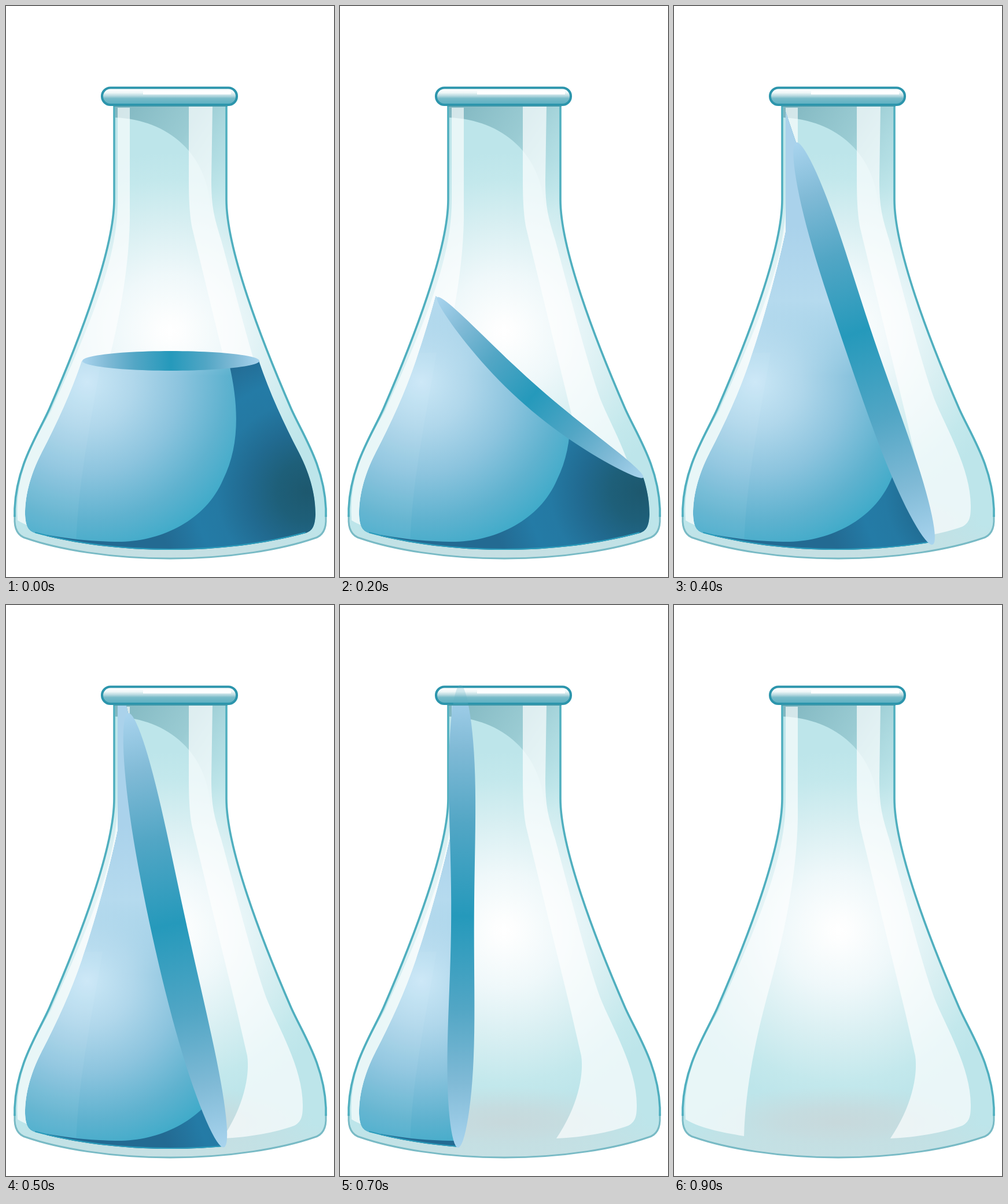
Animation of 567x988 px, one loop 1000 ms. Source, as an HTML page with a canvas:

```html
<!DOCTYPE html>
<html lang="en">
<head>
<meta charset="utf-8">
<title>Swirling flask</title>
<style>
html, body { margin: 0; width: 100%; height: 100%; overflow: hidden; background: #fff; }
canvas { display: block; width: 567px; height: 988px; }
</style>
</head>
<body>
<canvas id="stage" width="567" height="988"></canvas>
<script>
const ctx = document.getElementById('stage').getContext('2d');
const STEP = 100, STEPS = 10;

// The liquid surface is a bent lens between two tips.
// bow bends it, waist narrows its middle, core places its darkest point.
const keys = [
  { step: 0, x0: 132, y0: 614, x1: 438, y1: 614, width: 17, bow: 0, waist: 0, core: .5 },
  { step: 2, x0: 168, y0: 504, x1: 524, y1: 816, width: 19, bow: 21, waist: 0, core: .5 },
  { step: 4, x0: 211, y0: 236, x1: 447, y1: 932, width: 34, bow: 8, waist: .23, core: .47 },
  { step: 6, x0: 211, y0: 138, x1: 306, y1: 945, width: 36, bow: 14, waist: 0, core: .5 },
  { step: 7, x0: 208, y0: 138, x1: 204, y1: 939, width: 33, bow: -6, waist: .4, core: .5 },
  { step: 8, x0: 204, y0: 140, x1: 74, y1: 917, width: 27, bow: -61, waist: .14, core: .64 }
];

function poseAt(step) {
  const next = keys.find(k => k.step >= step);
  const prev = keys.findLast(k => k.step <= step);
  const t = (step - prev.step) / (next.step - prev.step || 1);
  return Object.fromEntries(Object.keys(prev).map(k => [k, prev[k] + (next[k] - prev[k]) * t]));
}

function polygon(pts) {
  const path = new Path2D();
  pts.forEach(p => path.lineTo(...p));
  path.closePath();
  return path;
}

function liquidShapes(pose) {
  const dx = pose.x1 - pose.x0, dy = pose.y1 - pose.y0, len = Math.hypot(dx, dy);
  // t runs along the chord, off points toward the liquid
  const at = (t, off) => [pose.x0 + dx * t - dy / len * off, pose.y0 + dy * t + dx / len * off];
  const far = [], near = [], spine = [];
  for (let i = 0; i <= 48; i++) {
    const angle = Math.PI * i / 48;
    const t = (1 - Math.cos(angle)) / 2, arch = Math.sin(Math.PI * t);
    const bend = pose.bow * arch;
    const half = pose.width * Math.sin(angle) * (1 - pose.waist * arch * arch);
    far.push(at(t, bend - half));
    near.unshift(at(t, bend + half));
    spine.push(at(t, bend));
  }
  return {
    surface: polygon([...far, ...near]),
    below: polygon([at(-4, 0), ...spine, at(5, 0), at(5, 2000), at(-4, 2000)])
  };
}

function mirrored(d) {
  const path = new Path2D(d);
  path.addPath(new Path2D(d), new DOMMatrix([-1, 0, 0, 1, 568, 0]));
  return path;
}

function stops(gradient, list) {
  list.forEach(([at, color]) => gradient.addColorStop(at, color));
  return gradient;
}
const linear = (x0, y0, x1, y1, list) => stops(ctx.createLinearGradient(x0, y0, x1, y1), list);
const radial = (x, y, r, list) => stops(ctx.createRadialGradient(x, y, 0, x, y, r), list);

function fill(path, style) {
  ctx.fillStyle = style;
  ctx.fill(path);
}
function stroke(path, style, width) {
  ctx.strokeStyle = style;
  ctx.lineWidth = width;
  ctx.stroke(path);
}
function clipped(path, draw) {
  ctx.save();
  ctx.clip(path);
  draw();
  ctx.restore();
}

const wall = 'V335 C187,420 128,575 75,697 C55,742 18,795 15,870';
const base = 'V885 C14,905 20,917 35,921 C90,940 180,956 284,956';
const glass = mirrored(`M284,172 H187 ${wall} ${base} Z`);
const walls = mirrored(`M187,172 ${wall} V884`);
const bottom = mirrored(`M15,880 ${base}`);
const floor = 'C120,931 200,941 284,941';
const inside = mirrored('M284,172 H193 V390 C185,430 160,530 131,614 C112,670 88,722 62,772 ' +
  `C40,815 33,850 33,880 C34,900 38,908 50,912 ${floor} Z`);
const floorLine = mirrored(`M50,912 ${floor}`);
const neckShade = new Path2D('M189,172 H379 V360 H354 C352,255 280,197 189,193 Z');
const leftShine = new Path2D('M193,176 H214 V370 C212,470 190,570 167,655 C142,745 124,830 121,919 ' +
  'C80,912 45,905 20,890 C15,810 45,760 78,700 C130,585 193,450 193,340 Z');
const rightShine = new Path2D('M316,172 H357 L355,300 C355,350 360,365 372,405 C395,490 425,610 450,680 ' +
  'C470,730 513,800 513,865 C513,882 512,894 498,901 C465,913 420,921 374,923 ' +
  'C410,870 422,815 417,780 L400,706 L322,385 C318,365 316,340 316,300 Z');
const shadow = new Path2D('M386,620 C402,690 405,760 375,820 C345,890 270,925 200,927 ' +
  'C140,927 100,920 70,915 V960 H567 V600 H382 Z');
const leftTint = new Path2D('M167,600 C142,745 124,830 121,940 H0 V600 Z');
const rim = new Path2D();
rim.roundRect(166, 141.5, 233, 29.5, 14.5);
const aboveNeck = new Path2D('M0,0 H567 V172 H0 Z');
const belowRim = new Path2D('M0,172 H567 V988 H0 Z');

const glassFill = radial(284, 563, 310, [
  [0, '#fff'], [.06, '#fdfefe'], [.32, '#eff8fa'], [.6, '#d8eff2'], [.85, '#c3e8ec'], [1, '#bde5ea']]);
const neckFill = linear(190, 180, 395, 315, [
  [0, 'rgba(96,158,170,.65)'], [.5, 'rgba(120,178,188,.5)'], [1, 'rgba(150,205,212,0)']]);
const liquidFill = radial(140, 650, 320, [
  [0, '#cae7f6'], [.25, '#b0d7eb'], [.5, '#8cc4de'], [.75, '#5fb2cf'], [1, '#34a8c7']]);
const crestFill = linear(0, 380, 0, 640, [
  [0, '#aad2eb'], [.5, '#b5daee'], [1, 'rgba(190,224,242,0)']]);
const darkFill = radial(520, 840, 260, [
  [0, '#1d586e'], [.2, '#1e5f79'], [.4, '#216a90'], [.6, '#2479a3'], [.75, '#247ba6'], [1, '#236a92']]);
const rimFill = linear(0, 143, 0, 171, [
  [0, '#fff'], [.25, '#eff7f8'], [.45, '#b5d8df'], [.6, '#79bbc9'], [1, '#5aafc1']]);

function drawGlass() {
  fill(glass, glassFill);
  clipped(glass, () => {
    ctx.save();
    ctx.translate(284, 895);
    ctx.scale(1, .25);
    ctx.fillStyle = radial(0, 0, 250, [
      [0, 'rgba(200,216,219,.95)'], [.4, 'rgba(200,217,220,.75)'], [1, 'rgba(200,220,223,0)']]);
    ctx.fillRect(-284, -260, 568, 520);
    ctx.restore();
    ctx.fillStyle = linear(0, 900, 0, 956, [[0, 'rgba(200,222,225,0)'], [1, 'rgba(200,222,225,.8)']]);
    ctx.fillRect(0, 900, 567, 60);
    fill(neckShade, neckFill);
    fill(leftShine, 'rgba(255,255,255,.65)');
    fill(rightShine, 'rgba(255,255,255,.68)');
  });
  stroke(bottom, '#78bac5', 3);
  stroke(walls, '#50afbf', 3.6);
}

function drawBody(below) {
  clipped(below, () => clipped(inside, () => {
    fill(inside, liquidFill);
    fill(leftTint, 'rgba(255,255,255,.05)');
    fill(inside, crestFill);
    fill(shadow, darkFill);
    stroke(floorLine, '#2b9cbb', 4);
  }));
}

function surfaceFill({ x0, y0, x1, y1, core }) {
  const shades = [[1, '#a9d4ee'], [.72, '#80bad6'], [.4, '#52a6c5'], [0, '#2599bb']];
  return linear(x0, y0, x1, y1, shades.flatMap(([d, color]) => [
    [core * (1 - d), color], [core + (1 - core) * d, color]]));
}

function drawRim() {
  fill(rim, rimFill);
  ctx.fillStyle = '#fff';
  ctx.fillRect(237, 147, 152, 6);
  stroke(rim, '#2c95ac', 4);
  ctx.fillStyle = '#4199aa';
  ctx.fillRect(186, 172, 197, 2);
}

function draw(step) {
  ctx.clearRect(0, 0, 567, 988);
  drawGlass();
  if (step > 8) {
    drawRim();
    return;
  }
  const pose = poseAt(step);
  const { surface, below } = liquidShapes(pose);
  drawBody(below);
  clipped(belowRim, () => fill(surface, surfaceFill(pose)));
  drawRim();
  clipped(aboveNeck, () => {
    ctx.globalAlpha = .25;
    fill(surface, '#62b0c4');
  });
}

function tick() {
  draw(Math.floor(performance.now() / STEP) % STEPS);
  requestAnimationFrame(tick);
}
tick();
</script>
</body>
</html>
```
